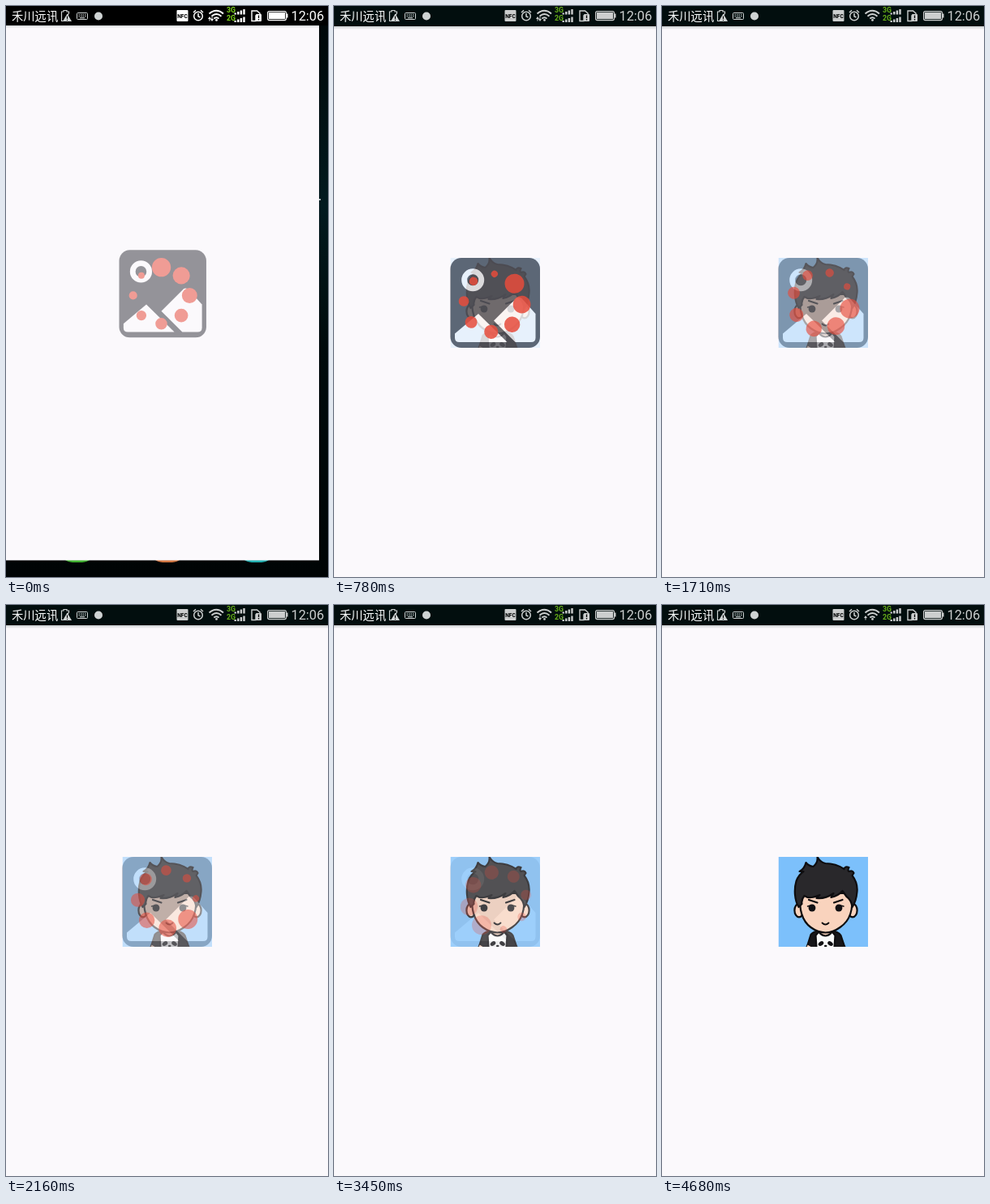
Recreate the animation shown at these times as an HTML page. Size 397 by 705 pixels, loop 4920 ms.

```html
<!DOCTYPE html>
<html lang="zh">
<head>
<meta charset="utf-8">
<style>
  html, body { margin: 0; width: 100%; height: 100%; overflow: hidden; background: #000; }
  svg { display: block; width: 100vw; height: 100vh; }
  .carrier { font: 14.3px "Noto Sans CJK SC", "Noto Sans CJK", sans-serif; fill: #fff; }
  .clock { font: 16.3px Roboto, sans-serif; }
  .net { font: bold 8.8px Roboto, sans-serif; fill: #7fd71c; }
  .nfc { font: bold 6.6px Roboto, sans-serif; fill: #000; }
  .line { fill: none; stroke: #fff; }
  .ink { stroke: #0e0d0f; stroke-width: 2.2; stroke-linejoin: round; stroke-linecap: round; }
</style>
</head>
<body>
<svg viewBox="0 0 397 705" preserveAspectRatio="none">
  <defs>
    <linearGradient id="wall" x2="0" y2="1">
      <stop offset="0" stop-color="#000506"/>
      <stop offset=".35" stop-color="#021a1f"/>
      <stop offset=".6" stop-color="#000a0c"/>
      <stop offset="1" stop-color="#000405"/>
    </linearGradient>
    <linearGradient id="shade" x2="0" y2="1">
      <stop offset="0" stop-color="#c9cdce"/>
      <stop offset="1" stop-color="#fbf9fc"/>
    </linearGradient>
    <clipPath id="frame"><rect width="110.5" height="111"/></clipPath>
  </defs>

  <!-- home screen -->
  <rect width="397" height="705" fill="url(#wall)"/>
  <circle cx="387" cy="239" r="1" fill="#e8f4f4"/>
  <rect x="67" y="647" width="42" height="40" rx="15" fill="#3fae2f"/>
  <rect x="178" y="647" width="42" height="40" rx="15" fill="#cf7440"/>
  <rect x="288" y="647" width="42" height="40" rx="15" fill="#23afb0"/>

  <!-- app window -->
  <g id="app">
    <rect width="397" height="705" fill="#fbf9fc"/>
    <rect y="25" width="397" height="4" fill="url(#shade)"/>
    <g id="picture">
      <g transform="translate(143.5 311)">
        <g id="holder">
          <rect width="110.5" height="111" rx="13.5" fill="#3c3b44"/>
          <g fill="#fbf9fc">
            <path fill-rule="evenodd" d="M13.7 27.3a14 14 0 1 0 28 0a14 14 0 1 0-28 0M20.7 27.3a7 7 0 1 1 14 0a7 7 0 1 1-14 0"/>
            <path d="M5.5 93.5L34.5 69 70 104H11Q5.5 104 5.5 98.5Z"/>
            <path d="M53.5 77.5L82 49Q85 47.5 88 50L105 69V98.5Q105 104 99.5 104H80Z"/>
          </g>
        </g>
        <g id="avatar" clip-path="url(#frame)">
          <rect width="110.5" height="111" fill="#7cc0fb"/>
          <g class="ink">
            <path d="M35 112L40 96Q43 92 50 91H65Q74 92 77 97L82 112Z" fill="#171619"/>
            <path d="M34 112L36 108 41 111V113ZM77 112L82 110 83 113Z" fill="#f9d3bd" stroke-width="1"/>
            <path d="M47 112L46 97 50 92H66L70 97 69 112Z" fill="#fafafa"/>
            <path d="M50 88L50 93Q58 102 66 93V88Z" fill="#f0c9b3"/>
            <ellipse cx="25.5" cy="66" rx="5.6" ry="8.4" fill="#f9d3bd"/>
            <ellipse cx="91.5" cy="66" rx="5.6" ry="8.4" fill="#f9d3bd"/>
            <path d="M27 45C25 66 29 79 40 87Q58 100 76 87C88 79 93 65 90 45Z" fill="#f9d3bd"/>
            <path fill="#29282b" d="M25 62C20 54 19 40 22 30Q25 22 31 18L26 18Q32 15 34 7Q37 11 43 12Q49 7 48 0Q52 7 58 8Q71 8 81 15Q82 11 87 13Q85 17 87 18Q91 16 93 20L91 23Q98 32 97 43Q96 55 91 62Q90 53 84 49L79 42Q74 48 65 50L68 45Q58 52 47 51L51 47Q42 51 36 50L32 48Q28 53 29 58Z"/>
            <path d="M37.5 53L48 56.500M79 53L68.500 56.500" fill="none"/>
            <path d="M54 81.500Q58 85.500 62 81.500" fill="none" stroke-width="1.800"/>
            <path d="M36 61L40 60M80.500 61L76.500 60" fill="none" stroke-width="1.400"/>
          </g>
          <g fill="#111013">
            <ellipse cx="41.500" cy="63" rx="4.400" ry="4.600"/>
            <ellipse cx="74.500" cy="63" rx="4.400" ry="4.600"/>
            <ellipse cx="52.500" cy="107" rx="3.600" ry="2.500" transform="rotate(-35 52.500 107)"/>
            <ellipse cx="64" cy="107" rx="3.600" ry="2.500" transform="rotate(35 64 107)"/>
            <ellipse cx="58.200" cy="110" rx="1.800" ry="1.200"/>
          </g>
        </g>
      </g>
      <g id="dots" fill="#e74c3c"></g>
    </g>
  </g>

  <!-- status bar -->
  <rect id="bar" width="397"/>
  <text class="carrier" x="7" y="17.500">禾川远讯</text>
  <g fill="#cfd3d3">
    <path d="M68.500 7H71V5.500H75V7H77.500V9L71 18.500H68.500Z" fill="none" stroke="#cfd3d3" stroke-width="1.200"/>
    <path d="M75.500 9.500L81 19H70Z"/>
    <path d="M75.500 12.500V16M75.500 17V18" stroke="#000" stroke-width="1.100"/>
    <rect x="87.500" y="8.500" width="13" height="8" rx="1" fill="none" stroke="#cfd3d3"/>
    <path d="M89.500 10.700H99M89.500 12.700H99" stroke="#cfd3d3" stroke-width="1.100" stroke-dasharray="1.500 1"/>
    <path d="M91 14.700H97" stroke="#cfd3d3" stroke-width="1.100"/>
    <circle cx="114" cy="12.500" r="5"/>
  </g>
  <g id="tray" fill="#fff">
    <rect x="210.500" y="5" width="14" height="14" rx="1"/>
    <text class="nfc" x="217.500" y="14.500" text-anchor="middle">NFC</text>
    <g class="line" stroke-width="1.500">
      <circle cx="237" cy="12.500" r="5.300"/>
      <path d="M237 9V12.700L239.500 14M231 8L234 5.200M240 5.200L243 8"/>
    </g>
    <path class="line" stroke-width="1.900" d="M250.500 9.500Q259.500 2 268 9.500M253.500 12.700Q259.500 7.500 265.500 12.700M256.300 15.600Q259.500 13 262.500 15.600"/>
    <circle cx="259.500" cy="17.400" r="1.400"/>
    <path id="up" d="M249 16L251 13 253 16ZM250.500 16H251.500V18.500H250.500Z"/>
    <path id="down" d="M252 16L254 19 256 16ZM253.500 13.500H254.500V16H253.500Z"/>
    <text class="net" x="272" y="8.200">3G</text>
    <text class="net" x="272" y="18">2G</text>
    <g id="signal"></g>
    <path d="M303 6H309.500L313 9V12H308V18.500H303Z" fill="none" stroke="#fff" stroke-width="1.400"/>
    <rect x="308" y="10" width="7" height="9" rx="1"/>
    <path d="M311.500 11.500V15M311.500 16V17.500" stroke="#000" stroke-width="1.300"/>
    <rect x="322.600" y="6.600" width="22.800" height="11" rx="2" fill="none" stroke="#fff" stroke-width="1.200"/>
    <rect x="324" y="8" width="20" height="8.200"/>
    <rect x="346" y="9.500" width="1.500" height="5"/>
    <text class="clock" x="351.500" y="18">12:06</text>
  </g>
</svg>
<script>
  const LOOP = 4920;
  const NS = 'http://www.w3.org/2000/svg';
  const $ = id => document.getElementById(id);
  const clamp = v => Math.min(1, Math.max(0, v));
  const mixOf = (a, b, k) => a + (b - a) * k;
  const set = (id, name, value) => $(id).setAttribute(name, value);

  function add(parent, tag, attrs) {
    const el = document.createElementNS(NS, tag);
    for (const k in attrs) el.setAttribute(k, attrs[k]);
    parent.appendChild(el);
  }

  // ring of shrinking dots, set slightly off its pivot
  for (let i = 0; i < 8; i++) {
    const a = i * Math.PI / 4;
    add($('dots'), 'circle', {
      cx: -2.4 + 35.8 * Math.cos(a),
      cy: -1.8 + 35.8 * Math.sin(a),
      r: 12 - 1.13 * i
    });
  }

  // two rows of signal bars
  for (const base of [10.5, 20]) {
    for (let i = 0; i < 4; i++) {
      const h = 2 + i * 1.5;
      add($('signal'), 'rect', { x: 281.5 + i * 3.6, y: base - h, width: 2.4, height: h });
    }
  }

  function draw(t) {
    const open = clamp(t / 120);
    const fade = clamp((t - 110) / 4500);

    set('app', 'transform', `translate(0 ${open - 1}) scale(${mixOf(0.972, 1, open)})`);
    set('picture', 'opacity', mixOf(0.53, 1, clamp(t / 300)));
    set('holder', 'opacity', 1 - fade);
    set('avatar', 'opacity', fade);
    set('dots', 'opacity', 1 - fade);
    set('dots', 'transform', `translate(198.8 366.3) rotate(${-90 + 0.0618 * t})`);

    set('bar', 'height', mixOf(24, 25, open));
    set('bar', 'fill', open < 1 ? '#000' : '#020e0e');
    set('tray', 'opacity', mixOf(1, 0.8, open));
    set('up', 'opacity', t < 1200 || t > 4410 ? 1 : 0);
    set('down', 'opacity', t < 1200 || (t > 2430 && t < 4410) ? 1 : 0);
  }

  const start = performance.now();
  function tick() {
    draw((performance.now() - start) % LOOP);
    requestAnimationFrame(tick);
  }
  tick();
</script>
</body>
</html>
```
